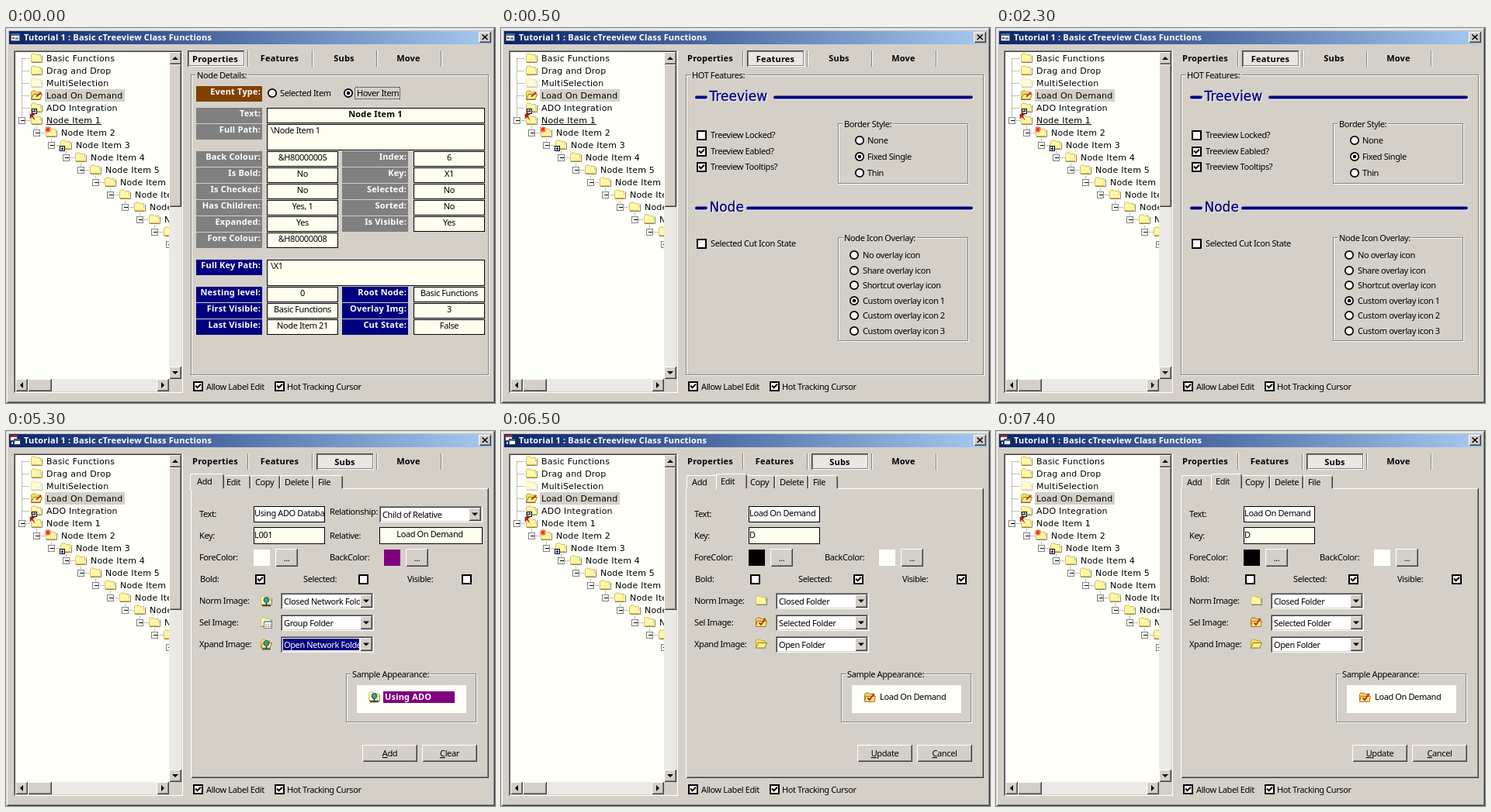
Animation, 630 px wide and 484 px high, one loop 8000 ms. Source, as an HTML page:

```html
<!DOCTYPE html>
<html lang="en">
<head>
<meta charset="utf-8">
<title>Treeview tutorial</title>
<style>
html, body { margin: 0; width: 100%; height: 100%; overflow: hidden; background: #d4d0c8; }
svg { display: block; width: 630px; height: 484px; }
text { font: 11px "Noto Sans", sans-serif; letter-spacing: -.38px; white-space: pre; }
.b { font-weight: bold; letter-spacing: .18px; }
.tree { font: 11px "DejaVu Sans", sans-serif; letter-spacing: .2px; }
.head { font: 17px "DejaVu Sans", sans-serif; letter-spacing: 0; stroke-width: .3px; }
.cap { paint-order: stroke; stroke: #d4d0c8; stroke-width: 5px; }
.u { text-decoration: underline; }
rect, .edge { shape-rendering: crispEdges; }
</style>
</head>
<body>
<svg id="stage" viewBox="0 0 630 484" xmlns="http://www.w3.org/2000/svg"></svg>
<script>
const FACE = '#d4d0c8', SHADE = '#808080', DARK = '#404040', NAVY = '#000080',
      PURPLE = '#800080', CREAM = '#fffff0', PAPER = '#fffffa';

// Drawing helpers; each returns SVG markup
const rect = (x, y, w, h, fill, more = '') =>
  `<rect x="${x}" y="${y}" width="${w}" height="${h}" fill="${fill}" ${more}/>`;
const path = (d, stroke, width = 1, fill = 'none', more = '') =>
  `<path d="${d}" fill="${fill}" stroke="${stroke}" stroke-width="${width}" ${more}/>`;
const crisp = (d, stroke, more = '') => path(d, stroke, 1, 'none', 'class="edge" ' + more);
const text = (x, y, s, cls = '', fill = '#000', anchor = 'start') =>
  `<text x="${x}" y="${y}" class="${cls}" fill="${fill}" text-anchor="${anchor}">${s}</text>`;
const mid = (x, y, s, cls, fill) => text(x, y, s, cls, fill, 'middle');
const at = (x, y, s) => `<g transform="translate(${x} ${y})">${s}</g>`;
const rows = (list, fn) => list.map(fn).join('');
const key = s => `<tspan class="u">${s[0]}</tspan>${s.slice(1)}`;

const edge = (x, y, w, h, tl, br) =>
  crisp(`M${x + .5} ${y + h - .5}V${y + .5}H${x + w - .5}`, tl) +
  crisp(`M${x + .5} ${y + h - .5}H${x + w - .5}V${y}`, br);
const raised = (x, y, w, h) => rect(x, y, w, h, FACE) +
  edge(x, y, w, h, '#fff', DARK) + edge(x + 1, y + 1, w - 2, h - 2, FACE, SHADE);
const sunken = (x, y, w, h, fill) => rect(x, y, w, h, fill) +
  edge(x, y, w, h, SHADE, '#fff') + edge(x + 1, y + 1, w - 2, h - 2, DARK, FACE);
const box = (x, y, w, h, fill = CREAM) =>
  rect(x + .5, y + .5, w - 1, h - 1, fill, 'stroke="#000"');
const group = (x, y, w, h, label) =>
  rect(x + 1.5, y + 1.5, w - 1, h - 1, 'none', 'stroke="#fff"') +
  rect(x + .5, y + .5, w - 1, h - 1, 'none', `stroke="${SHADE}"`) +
  text(x + 8, y + 5, label, 'cap');
const check = (x, y, on) =>
  rect(x + 1, y + 1, 11, 11, '#fff', 'stroke="#000" stroke-width="2"') +
  (on ? path(`M${x + 3.2} ${y + 5.5}l2.3 2.8l4.4-4.6`, '#000', 2) : '');
const radio = (x, y, on, label, dx = 10) =>
  `<circle cx="${x}" cy="${y}" r="5.2" fill="#fff" stroke="#000" stroke-width="1.7"/>` +
  (on ? `<circle cx="${x}" cy="${y}" r="2.3"/>` : '') + text(x + dx, y + 4, label);
const arrow = (x, y, turn) =>
  `<path d="M-4-2H4L0 2z" transform="translate(${x} ${y}) rotate(${turn})"/>`;
const button = (x, y, w, h, s) => raised(x, y, w, h) + mid(x + w / 2, y + h / 2 + 4, s);
const combo = (x, y, w, s, hot) => sunken(x, y, w, 21, '#fff') +
  (hot ? rect(x + 3, y + 3, w - 22, 15, NAVY) : '') +
  clip(x + 3, y, w - 20, 21, text(x + 4, y + 15, s, '', hot ? '#fff' : '#000')) +
  raised(x + w - 18, y + 2, 16, 17) + arrow(x + w - 10, y + 10.5, 0);

let clips = 0;
const clip = (x, y, w, h, s) => {
  const id = 'c' + clips++;
  return `<clipPath id="${id}"><rect x="${x}" y="${y}" width="${w}" height="${h}"/></clipPath>` +
    `<g clip-path="url(#${id})">${s}</g>`;
};

// 16px icons
const folder = path('M1.5 12.5V3.5L3 2H7L8.5 3.5H13.5V12.5z', '#d0c060', 1, '#fff69a') +
  path('M4 11.5L2.5 6.5H12L14 11.5', '#fffbd0') + path('M2 13.5H15.5V4.5', '#8c8450');
const open = path('M1.5 12.5V3.5L3 2H7L8.5 3.5H13V7', '#c8a830', 1, '#f5dc62') +
  path('M1.5 13L4.5 6.5H15.5L13 13z', '#8c7828', 1, '#fff08a');
const picked = path('M1.5 12.5V3.5L3 2H7L8.5 3.5H14V12.5z', '#a87820', 1, '#f8cc58') +
  path('M1.5 13.5L3 6.5H15.5L14 13.5z', '#b07818', 1, '#ffe288') +
  path('M5.5 8.5L8 11L13.5 3', '#c02818', 1.8);
const active = open + path('M8 9.5L14.5 4', '#c02818', 1.8) + path('M1.5 13.5H13.5', '#a04818');
const globe = '<circle cx="8.5" cy="7" r="3.4" fill="#3098d0" stroke="#184878"/>' +
  path('M6.5 6l2-1 1 2-1 2', '#40b050', 1.4) + path('M8.5 10.5V14M3 14.5H14', '#303830', 1.5);
const net = folder + globe, netOpen = open + globe;
const team = folder + rect(5, 6, 10, 9, '#fff', 'stroke="#6880a8"') + rect(5, 6, 10, 2, '#7898d0') +
  rows([0, 1, 2], i => rect(6.5 + i * 3, 9.5, 2, 1.5, '#80a8d8') + rect(6.5 + i * 3, 12, 2, 1.5, '#d8a048'));
const badge = rect(.5, 9.5, 6, 6, '#fff', 'stroke="#000"');
const share = badge + path('M2 14V12H4.5M3.5 10.5L5 12L3.5 13.5', '#000');
const shortcut = badge + path('M3.5 10.5V14M2 12.5L3.5 14L5 12.5', NAVY, 1.2);
const flag = path('M0 0V6L2 3.5L6 7.5L3.5 2.5L6 0z', '#a01010', .5, '#c01818');
const star = path('M4-1V7M0 3H8M1 0L7 6M7 0L1 6', '#f03018', 1.2);

const dots = d => crisp(d, SHADE, 'stroke-dasharray="1 1"');
const plus = (x, y) => rect(x - 3.5, y - 3.5, 8, 8, '#fff', `stroke="${SHADE}"`) +
  crisp(`M${x - 1.5} ${y + .5}h5`, '#000');

function tree() {
  const top = ['Basic Functions', 'Drag and Drop', 'MultiSelection', 'Load On Demand', 'ADO Integration'];
  let s = dots('M20.5 39V119') + rect(50, 79, 103, 16, FACE);
  top.forEach((name, i) => {
    const y = 39 + i * 16, icon = i == 3 ? active : folder;
    s += dots(`M21 ${y + .5}H31`) +
      at(31, y - 8, i == 2 ? `<g opacity=".45">${icon}</g>` : icon) + text(52, y + 4, name, 'tree');
  });
  for (let k = 0; k < 11; k++) {
    const x = 20 + 19 * k, y = 119 + 16 * k;
    if (k) s += dots(`M${x + .5} ${y - 8}V${y}`);
    s += dots(`M${x} ${y + .5}h12`) + plus(x, y) + at(x + 11, y - 8, folder) +
      text(x + 32, y + 4, 'Node Item ' + (k + 1), 'tree');
  }
  s += at(33, 95, share) + at(31, 111, flag) + at(50, 128, star) + at(69, 143, shortcut);
  return sunken(10, 29, 218, 442, PAPER) + clip(12, 31, 198, 422, s) +
    rect(210, 31, 16, 422, '#ebe9e5') + rect(12, 453, 198, 16, '#ebe9e5') + rect(210, 453, 16, 16, FACE) +
    raised(210, 31, 16, 16) + raised(210, 47, 16, 184) + raised(210, 437, 16, 16) +
    raised(12, 453, 16, 16) + raised(28, 453, 31, 16) + raised(194, 453, 16, 16) +
    arrow(218, 39, 180) + arrow(218, 445, 0) + arrow(20, 461, 90) + arrow(202, 461, -90);
}

function shell() {
  return `<defs><linearGradient id="bar"><stop stop-color="#0a246a"/><stop offset="1" stop-color="#a6caf0"/></linearGradient></defs>` +
    rect(0, 0, 630, 484, FACE) + edge(0, 0, 630, 484, FACE, DARK) + edge(1, 1, 628, 482, '#fff', SHADE) +
    rect(4, 4, 622, 17, 'url(#bar)') + text(23, 16, 'Tutorial 1 : Basic cTreeview Class Functions', 'b', '#fff') +
    raised(609, 5, 16, 14) + path('M613.5 8.5l7 6.5M620.5 8.5l-7 6.5', '#000', 1.6) + tree() +
    check(241, 456, 1) + text(258, 467, 'Allow Label Edit') +
    check(346, 456, 1) + text(362, 467, 'Hot Tracking Cursor');
}

const formIcon = rect(6.5, 7.5, 11, 9, '#fff', 'stroke="#606060"') + rect(7, 8, 10, 2, '#2870c0') +
  rect(8, 12, 3, 2, '#c03030') + rect(12, 12, 4, 3, '#60a0a0');
const formsIcon = rect(5.5, 5.5, 9, 7, '#fff', 'stroke="#404040"') + rect(6, 6, 8, 2, '#c03030') +
  rect(10.5, 10.5, 8, 7, '#fff', 'stroke="#404040"') + rect(11, 11, 7, 2, '#2870c0') + rect(7, 14, 2, 3, '#c0d8f0');

const bar = on => rows(['Properties', 'Features', 'Subs', 'Move'], (name, i) => {
  const x = 269.5 + i * 83, left = Math.round(x - 36), sel = i == on, line = 311.5 + i * 83;
  return (sel ? rect(left, 29, 74, 21, '#e9e7e2') + edge(left, 29, 74, 21, DARK, '#fff') +
      edge(left + 1, 30, 72, 19, SHADE, SHADE) : '') +
    mid(x + (sel && i ? 1 : 0), sel ? 44 : 43, name, 'b') +
    crisp(`M${line} 29V50`, SHADE) + crisp(`M${line + 1} 29V50`, '#fff');
});

const label = (x, y, s, fill) =>
  rect(x - 1, y, 85, 20, fill) + text(x + 82, y + 11, s, 'b', '#fff', 'end');
const pairs = (x, y, boxX, fill, list) => rows(list, ([name, value], i) => {
  const top = y + i * 21;
  return label(x, top, name, fill) + box(boxX, top, 92, 20) + mid(boxX + 46, top + 12, value);
});

function properties() {
  return bar(0) + group(238, 60, 384, 388, 'Node Details:') +
    label(246, 75, 'Event Type:', '#804000') +
    radio(343, 84, 0, 'Selected Item') + radio(441, 84, 1, 'Hover Item', 11) +
    rect(449.5, 76.5, 58, 15, 'none', 'stroke="#000" stroke-dasharray="1 1"') +
    label(246, 103, 'Text:', SHADE) + box(336, 103, 281, 20) + mid(476, 115, 'Node Item 1', 'b') +
    label(246, 124, 'Full Path:', SHADE) + box(336, 124, 281, 34) + text(341, 136, '\\Node Item 1') +
    pairs(246, 159, 336, SHADE, [['Back Colour:', '&amp;H80000005'], ['Is Bold:', 'No'], ['Is Checked:', 'No'],
      ['Has Children:', 'Yes, 1'], ['Expanded:', 'Yes'], ['Fore Colour:', '&amp;H80000008']]) +
    pairs(434, 159, 525, SHADE, [['Index:', '6'], ['Key:', 'X1'], ['Selected:', 'No'], ['Sorted:', 'No'], ['Is Visible:', 'Yes']]) +
    label(246, 299, 'Full Key Path:', NAVY) + box(336, 299, 281, 34) + text(341, 311, '\\X1') +
    pairs(246, 334, 336, NAVY, [['Nesting level:', '0'], ['First Visible:', 'Basic Functions'], ['Last Visible:', 'Node Item 21']]) +
    pairs(434, 334, 525, NAVY, [['Root Node:', 'Basic Functions'], ['Overlay Img:', '3'], ['Cut State:', 'False']]);
}

const heading = (y, s, from) => {
  const draw = ink => path(`M252 ${y + .5}H264M${from} ${y + .5}H606`, ink, 4, 'none', 'stroke-linecap="round"') +
    `<g stroke="${ink}">${text(268.5, y + 4.5, s, 'head', ink)}</g>`;
  return at(1, 1, draw('#fff')) + draw(NAVY);
};

function features() {
  return bar(1) + group(238, 60, 384, 388, 'HOT Features:') + heading(89, 'Treeview', 353) + heading(232, 'Node', 318) +
    rows(['Treeview Locked?', 'Treeview Eabled?', 'Treeview Tooltips?'], (s, i) =>
      check(252, 132 + i * 21 - (i > 1), i) + text(270, 142 + i * 21 - (i > 1), s)) +
    group(434, 123, 168, 78, 'Border Style:') +
    rows(['None', 'Fixed Single', 'Thin'], (s, i) => radio(462, 145 + i * 21, i == 1, s)) +
    check(252, 272, 0) + text(270, 282, 'Selected Cut Icon State') +
    group(434, 270, 168, 134, 'Node Icon Overlay:') +
    rows(['No', 'Share', 'Shortcut', 'Custom', 'Custom', 'Custom'], (s, i) =>
      radio(455, Math.round(293 + i * 19.6), i == 3, `${s} overlay icon${i > 2 ? ' ' + (i - 2) : ''}`, 11));
}

function tabs(on) {
  const xs = [239, 279, 315, 353, 396, 434];
  const tab = (s, i) => {
    const sel = i == on, a = xs[i] - (sel ? 2 : 0), b = xs[i + 1] + (sel ? 2 : 0), y = sel ? 55 : 57;
    return rect(a, y, b - a, 76 - y, FACE) +
      crisp(`M${a + .5} ${sel ? 76 : 74}V${y + 2}L${a + 2} ${y + .5}H${b - 2}`, '#fff') +
      crisp(`M${b - 1.5} ${y + 1}V74`, SHADE) + crisp(`M${b - .5} ${y + 2}V74`, DARK) +
      text([246, 284, 321, 359, 402][i] - (sel && i ? 1 : 0), sel ? 69 : 70, s);
  };
  const names = ['Add', 'Edit', 'Copy', 'Delete', 'File'];
  return raised(238, 74, 384, 374) + rows(names, (s, i) => i == on ? '' : tab(s, i)) + tab(names[on], on);
}

function subs(o) {
  const flags = [['Bold:', 250, 321], ['Selected:', 383, 454], ['Visible:', 517, 587]];
  return bar(2) + tabs(o.tab) +
    text(249, 111, 'Text:') + box(319, 97, 92, 21, '#fff') + clip(320, 98, 90, 19, text(320, 110, o.text)) +
    text(249, 139, 'Key:') + box(319, 124, 92, 22) + text(320, 138, o.key) +
    text(249, 167, 'ForeColor:') + rect(319, 153, 21, 21, o.fore) + button(347, 152, 29, 23, '...') +
    text(417, 167, 'BackColor:') + rect(487, 153, 21, 21, o.back) + button(515, 152, 29, 23, '...') +
    rows(flags, ([s, x, cx], i) => text(x, 195, s) + check(cx, 185, o.flags[i])) +
    rows(['Norm', 'Sel', 'Xpand'], (s, i) => {
      const y = 209 + i * 28, [icon, name] = o.images[i];
      return text(249, y + 14, s + ' Image:') + at(327, y + 2, icon) + combo(354, y, 120, name, o.hot === i);
    }) +
    group(438, 313, 168, 63, 'Sample Appearance:') + rect(452, 328, 141, 36, PAPER) + o.sample +
    rows(o.buttons, (s, i) => button(459 + i * 77, 405, 71, 22, key(s)));
}

const add = () => subs({
  tab: 0, text: 'Using ADO Database', key: 'L001', fore: PAPER, back: PURPLE, flags: [1, 0, 0], hot: 2,
  images: [[net, 'Closed Network Folder'], [team, 'Group Folder'], [netOpen, 'Open Network Folder']],
  sample: at(466, 335, net) + rect(486, 336, 92, 15, PURPLE) + text(488, 347, 'Using ADO', 'b', '#fff'),
  buttons: ['Add', 'Clear']
}) + text(417, 108, 'Relationship:') + combo(481, 97, 133, 'Child of Relative') +
  text(417, 139, 'Relative:') + box(481, 124, 133, 22) + mid(546, 137, 'Load On Demand');

const edit = () => subs({
  tab: 1, text: 'Load On Demand', key: 'D', fore: '#000', back: PAPER, flags: [0, 1, 1],
  images: [[folder, 'Closed Folder'], [picked, 'Selected Folder'], [open, 'Open Folder']],
  sample: at(467, 336, picked) + text(488, 347, 'Load On Demand'),
  buttons: ['Update', 'Cancel']
});

const early = formIcon + crisp('M52 124.5H123', '#000');
const scenes = [
  { from: 0, art: early + properties() },
  { from: 500, art: early + features() },
  { from: 3500, art: formsIcon + add() },
  { from: 6500, art: formsIcon + edit() }
];
const LOOP = 8000;
const stage = document.getElementById('stage');
stage.innerHTML = shell() + rows(scenes, s => `<g class="scene">${s.art}</g>`);
const layers = [...stage.querySelectorAll('.scene')];

function draw(ms) {
  const now = scenes.filter(s => s.from <= ms).length - 1;
  layers.forEach((g, i) => g.style.display = i == now ? '' : 'none');
}
const start = performance.now();
function tick() {
  draw((performance.now() - start) % LOOP);
  requestAnimationFrame(tick);
}
tick();
</script>
</body>
</html>
```
